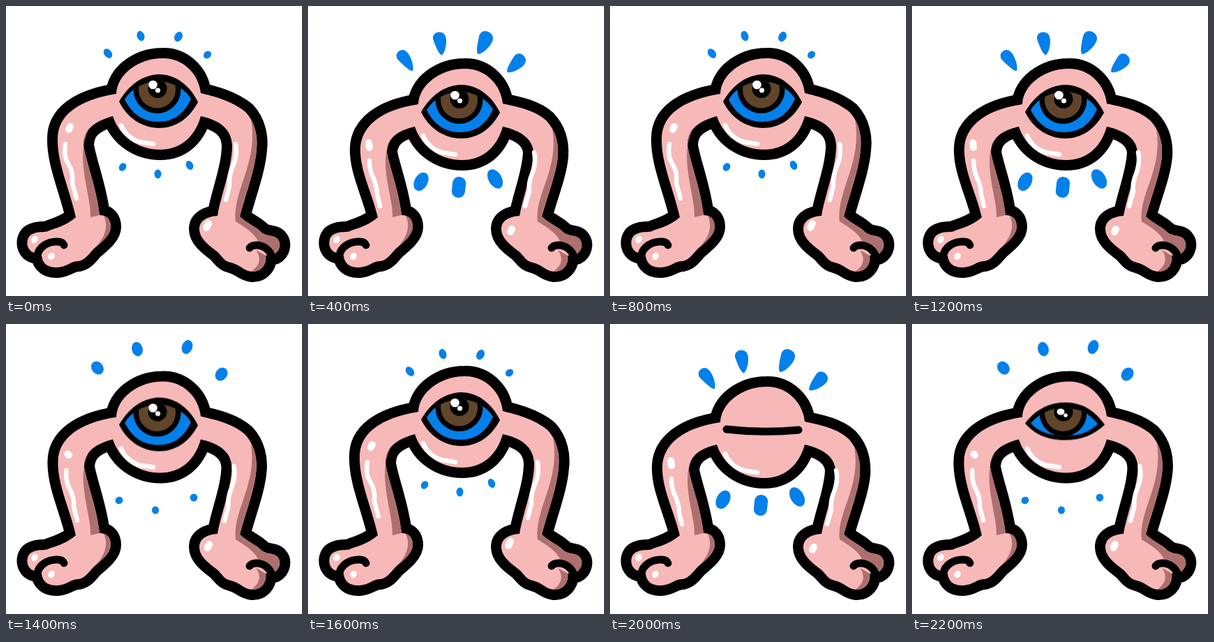
An HTML page without scripts for the animation above (2.4 s loop, 424 by 416 pixels).

```html
<!DOCTYPE html>
<html lang="en">
<head>
<meta charset="utf-8">
<title>Walking eye</title>
<style>
  html, body { margin: 0; width: 100%; height: 100%; overflow: hidden; background: #fff; }
  svg { display: block; width: 424px; height: 416px; }

  /* two steps down, two steps up */
  .morph { d: var(--up); animation: morph .8s steps(2) infinite; }
  .bob { animation: bob .8s steps(2) infinite; }
  @keyframes morph { 0%, 100% { d: var(--up); } 50% { d: var(--down); } }
  @keyframes bob { 0%, 100% { transform: translateY(0); } 50% { transform: translateY(15px); } }

  .skin { fill: #f7b8b8; stroke: #000; stroke-width: 30; stroke-linejoin: round; paint-order: stroke; }
  .shade { fill: #ad706e; }
  .shine { fill: none; stroke: #fff; stroke-width: 6.5; stroke-linecap: round; stroke-linejoin: round; }
  .dot { stroke-width: 10; }
  .claw { fill: none; stroke: #000; stroke-width: 11; stroke-linecap: round; }
  .blue { fill: #0480ea; }
  .brown { fill: #60452b; }
  .white { fill: #fff; }

  .drops { opacity: 0; animation: show .8s step-end infinite; animation-delay: calc(var(--n) * .2s - .8s); }
  @keyframes show { 0% { opacity: 1; } 25%, 100% { opacity: 0; } }

  .open { animation: open 2.4s step-end infinite; }
  .half { opacity: 0; animation: half 2.4s step-end infinite; }
  .shut { opacity: 0; animation: shut 2.4s step-end infinite; }
  @keyframes open { 0% { opacity: 1; } 75%, 100% { opacity: 0; } }
  @keyframes half { 0% { opacity: 0; } 75% { opacity: 1; } 83.333% { opacity: 0; } 91.667%, 100% { opacity: 1; } }
  @keyframes shut { 0% { opacity: 0; } 83.333% { opacity: 1; } 91.667%, 100% { opacity: 0; } }

  #body {
    --up: path("M158 126C159 98 190 75 224 75C252 74 276 96 279 125C296 129 324 136 343 152C358 168 361 190 359 205C357 235 343 270 335 302C345 312 358 316 366 325C374 331 384 328 389 334C395 341 392 352 384 356L372 358C374 372 364 382 352 381C340 380 336 371 322 368C312 366 310 359 302 352C290 343 277 333 277 320C277 308 288 302 303 301C308 270 324 232 324 200C323 176 306 164 279 158C270 190 248 206 221 206C190 206 163 188 153 158C125 166 111 178 111 200C115 225 130 262 134 300C146 300 150 308 150 317C150 328 138 338 126 348C118 356 114 364 104 366C92 366 88 374 74 375C60 376 52 369 51 358L38 353C28 348 28 331 38 327C48 322 56 326 62 322C78 317 90 312 100 303C92 265 73 225 74 190C74 158 102 135 158 126Z");
    --down: path("M158 141C159 113 190 90 224 90C252 89 276 111 279 140C296 144 323 148 341 164C356 180 359 199 358 215C356 240 343 272 335 302C345 312 358 316 366 325C374 331 384 328 389 334C395 341 392 352 384 356L372 358C374 372 364 382 352 381C340 380 336 371 322 368C312 366 310 359 302 352C290 343 277 333 277 320C277 308 288 302 303 301C308 272 322 240 323 210C322 191 306 179 279 173C270 205 248 221 221 221C190 221 163 203 153 173C127 179 114 190 113 210C117 232 130 264 134 300C146 300 150 308 150 317C150 328 138 338 126 348C118 356 114 364 104 366C92 366 88 374 74 375C60 376 52 369 51 358L38 353C28 348 28 331 38 327C48 322 56 326 62 322C78 317 90 312 100 303C92 268 74 236 75 204C76 174 103 149 158 141Z");
  }
  #shadeL {
    --up: path("M118 179C113 184 111 191 111 200C115 225 130 262 134 300L121 303C123 275 98 215 118 179Z");
    --down: path("M118 192C114 197 113 203 113 210C117 232 130 264 134 300L121 303C123 278 100 225 118 192Z");
  }
  #shadeR {
    --up: path("M351 163C359 177 360 194 359 205C357 235 343 270 335 302L329 310C324 265 362 225 351 163Z");
    --down: path("M350 176C357 188 359 203 358 215C356 240 343 272 335 302L329 310C324 270 360 235 350 176Z");
  }
  #shineL {
    --up: path("M85 198Q82 216 89 226Q97 238 95 254L101 276");
    --down: path("M88 222Q88 236 94 248Q99 260 99 270L103 287");
  }
  #shineR {
    --up: path("M329 198Q332 214 325 230Q319 244 320 258L315 278");
    --down: path("M324 210Q327 224 322 238Q315 254 317 266L311 287");
  }
  #dotL {
    --up: path("M90 177L92 173");
    --down: path("M87 196L88 203");
  }
  #dotR {
    --up: path("M290 312L287 318");
    --down: path("M292 320L290 324");
  }
</style>
</head>
<body>
<svg viewBox="0 0 424 416">
  <defs>
    <path id="tear" d="M0-16C-6-16-9-11-8-6C-6 3-4 13 0 16C4 15 9 3 9-6C9-12 6-16 0-16Z"/>
    <path id="wide" d="M170 134C180 118 197 109 218 108C240 109 256 119 265 133C255 155 240 166 218 166C195 166 180 154 170 134Z"/>
    <path id="slim" d="M170 135C182 121 198 113 218 113C240 113 256 122 266 136C253 148 240 153 218 153C198 153 182 147 170 135Z"/>
    <clipPath id="wideClip"><use href="#wide"/></clipPath>
    <clipPath id="slimClip"><use href="#slim"/></clipPath>
    <g id="iris">
      <circle cx="216.5" cy="120" r="34"/>
      <circle class="brown" cx="216.5" cy="120" r="26.5"/>
      <circle cx="217" cy="118.5" r="13.5"/>
    </g>
  </defs>

  <path id="body" class="skin morph"/>

  <path id="shadeL" class="shade morph"/>
  <path id="shadeR" class="shade morph"/>
  <path class="shade" d="M140 301C148 303 150 310 150 317C150 328 138 338 126 348C140 335 148 318 140 301Z"/>
  <path class="shade" d="M335 302C345 312 358 316 366 325C374 331 384 328 389 334C395 341 392 352 384 356C380 346 372 338 361 337C354 324 344 319 329 309Z"/>
  <path class="shade" d="M372 358C374 372 364 382 351 381C364 373 366 361 358 350Z"/>

  <path class="claw" d="M45 358C47 345 60 338 73 338Q81 338 83 343"/>
  <path class="claw" d="M381 361C379 350 368 343 359 343Q352 343 349 347"/>

  <path id="shineL" class="shine morph"/>
  <path id="shineR" class="shine morph"/>
  <path id="dotL" class="shine dot morph"/>
  <path id="dotR" class="shine dot morph"/>
  <ellipse class="white" cx="41" cy="335" rx="4.5" ry="5.5" transform="rotate(25 41 335)"/>
  <ellipse class="white" cx="65" cy="359" rx="4.5" ry="5.5" transform="rotate(25 65 359)"/>

  <g class="bob">
    <path class="shine" d="M165 171C170 184 181 192 192 195L211 198"/>

    <g class="open">
      <path d="M162 137C176 113 195 99 219 98C244 98 264 115 275 138C262 162 243 175 219 175C195 175 173 160 162 137Z"/>
      <use href="#wide" class="blue"/>
      <g clip-path="url(#wideClip)"><use href="#iris"/></g>
      <circle class="white" cx="210.5" cy="113" r="6.3"/>
      <circle class="white" cx="217.5" cy="121" r="3.6"/>
    </g>

    <g class="half">
      <path d="M162 135C176 116 196 105 219 105C244 105 262 117 276 137C260 152 243 159 218 159C193 159 175 150 162 135Z"/>
      <use href="#slim" class="blue"/>
      <g clip-path="url(#slimClip)"><use href="#iris"/></g>
      <ellipse class="white" cx="213" cy="118.5" rx="5.5" ry="4.5"/>
      <circle class="white" cx="220" cy="123.5" r="2.8"/>
    </g>

    <path class="shut" d="M167 136Q218 142 270 137" fill="none" stroke="#000" stroke-width="11" stroke-linecap="round"/>
  </g>

  <g class="drops blue" style="--n:0">
    <ellipse rx="5.3" ry="7.5" transform="translate(146 68) rotate(-38)"/>
    <ellipse rx="5.3" ry="7.3" transform="translate(193 43) rotate(-18)"/>
    <ellipse rx="5.5" ry="7.5" transform="translate(247 44) rotate(28)"/>
    <ellipse rx="5" ry="6" transform="translate(288.5 70) rotate(50)"/>
    <ellipse rx="5" ry="6" transform="translate(167 231) rotate(35)"/>
    <ellipse rx="5" ry="6.5" transform="translate(217.5 241)"/>
    <ellipse rx="5" ry="6.8" transform="translate(263 228.5) rotate(-25)"/>
  </g>

  <g class="drops blue" style="--n:1">
    <use href="#tear" transform="translate(143 71) rotate(-32) scale(.68 .88)"/>
    <ellipse rx="8" ry="12.3" transform="translate(191 47) rotate(-10)"/>
    <ellipse rx="8.5" ry="12.8" transform="translate(250 47) rotate(32)"/>
    <ellipse rx="7.5" ry="11.5" transform="translate(292 73) rotate(46)"/>
    <ellipse rx="6" ry="10.5" transform="translate(163 241) rotate(28)"/>
    <ellipse rx="6.5" ry="9.8" transform="translate(217 248)"/>
    <ellipse rx="6" ry="9" transform="translate(267.5 237) rotate(-32)"/>
  </g>

  <g class="drops blue" style="--n:2">
    <use href="#tear" transform="translate(140 79) rotate(-34) scale(1 1.08)"/>
    <use href="#tear" transform="translate(189 54) rotate(-8) scale(1.08 1.04)"/>
    <use href="#tear" transform="translate(251 53) rotate(26) scale(1.2 1.1)"/>
    <use href="#tear" transform="translate(297 83) rotate(45) scale(1.1 1.04)"/>
    <ellipse rx="9.5" ry="14" transform="translate(162 252) rotate(28)"/>
    <rect x="-9.5" y="-15" width="19" height="30" rx="9" transform="translate(216 260) rotate(6)"/>
    <ellipse rx="9.5" ry="15" transform="translate(268 248) rotate(-30)"/>
  </g>

  <g class="drops blue" style="--n:3">
    <ellipse rx="8.3" ry="10" transform="translate(131 63) rotate(-38)"/>
    <ellipse rx="7.8" ry="10.3" transform="translate(188 36) rotate(-15)"/>
    <ellipse rx="7.5" ry="10.2" transform="translate(259.5 33) rotate(22)"/>
    <ellipse rx="8.3" ry="10" transform="translate(308.5 72) rotate(38)"/>
    <ellipse rx="5.2" ry="5.6" transform="translate(162 253) rotate(50)"/>
    <ellipse rx="5" ry="5.6" transform="translate(214 267)"/>
    <ellipse rx="5.3" ry="5.6" transform="translate(269 249)"/>
  </g>
</svg>
</body>
</html>
```
